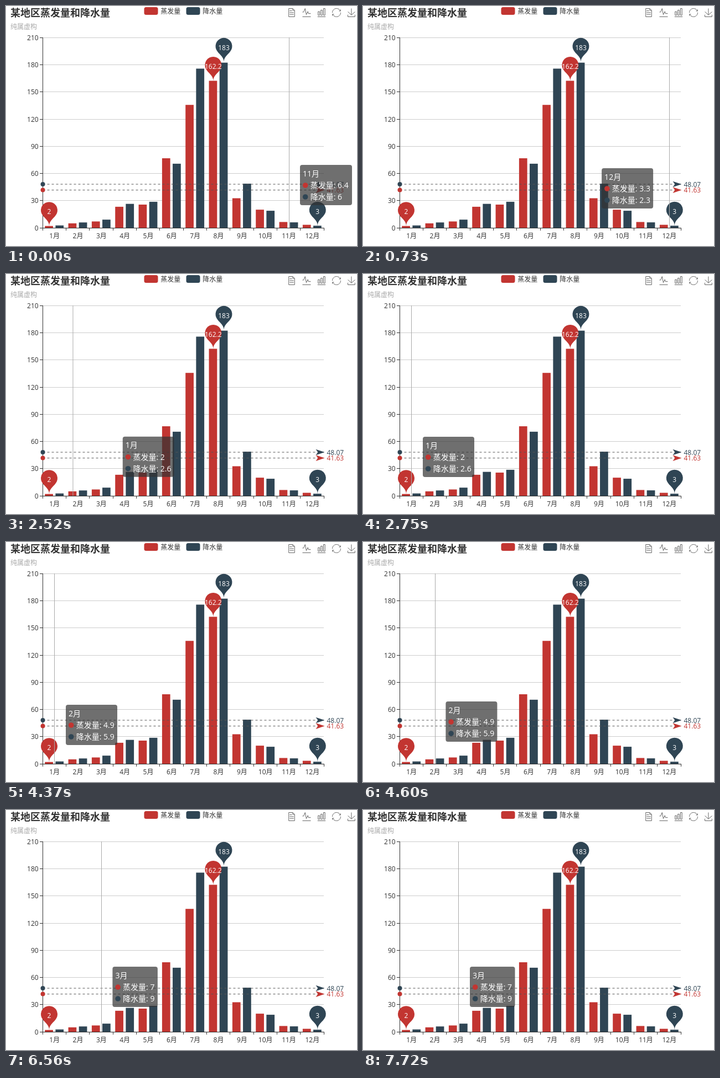
Write an HTML page that moves like this. It is 634x435 px and loops after 8000 ms.

```html
<!DOCTYPE html>
<html lang="zh-CN">
<head>
<meta charset="utf-8">
<title>某地区蒸发量和降水量</title>
<style>
  html, body { margin: 0; width: 100%; height: 100%; overflow: hidden; background: #fff; }
  svg { display: block; width: 634px; height: 435px; }
  text { font: 12px "Open Sans", "Noto Sans CJK SC", "Noto Sans CJK", sans-serif; fill: #333; }
  .title { font-size: 18px; font-weight: 700; }
  .sub { fill: #aaa; }
  .end { text-anchor: end; }
  .mid { text-anchor: middle; }
  .pin { text-anchor: middle; fill: #fff; }
  #tip text { font-size: 14px; fill: #fff; }
  #tools path { fill: none; stroke: #666; vector-effect: non-scaling-stroke; }
</style>
</head>
<body>
<svg viewBox="0 0 634 435">
  <text class="title" x="8" y="18.5">某地区蒸发量和降水量</text>
  <text class="sub" x="8" y="41.5">纯属虚构</text>
  <g id="tools"></g>
  <g id="chart"></g>
  <line id="pointer" y1="57" y2="402" stroke="#aaa"/>
  <g id="tip">
    <rect id="box" height="73" rx="4" fill="rgba(50,50,50,.7)"/>
    <circle cx="9.7" cy="37" r="4.8" fill="#c23531"/>
    <circle cx="9.7" cy="58" r="4.8" fill="#2f4554"/>
    <text id="month" x="5" y="20.7"></text>
    <text id="evap" x="18.7" y="41.9"></text>
    <text id="rain" x="18.7" y="62.9"></text>
  </g>
</svg>
<script>
const RED = '#c23531', BLUE = '#2f4554';
const LEFT = 66, RIGHT = 574, BASE = 402, HEIGHT = 345, MAX = 210;
const BAND = (RIGHT - LEFT) / 12;
const BAR = BAND * 0.8 / 2.3;
const evap = [2, 4.9, 7, 23.2, 25.6, 76.7, 135.6, 162.2, 32.6, 20, 6.4, 3.3];
const rain = [2.6, 5.9, 9, 26.4, 28.7, 70.7, 175.6, 182.2, 48.7, 18.8, 6, 2.3];

const $ = id => document.getElementById(id);
const chart = $('chart');

function add(parent, tag, attrs, text) {
  const el = document.createElementNS('http://www.w3.org/2000/svg', tag);
  for (const key in attrs) el.setAttribute(key, attrs[key]);
  if (text !== undefined) el.textContent = text;
  parent.appendChild(el);
  return el;
}
const path = (d, attrs) => add(chart, 'path', { d, ...attrs });
const label = (x, y, text, attrs) => add(chart, 'text', { x, y, ...attrs }, text);

const yOf = v => BASE - v / MAX * HEIGHT;
const barX = (month, series) => LEFT + BAND * (month + 0.1) + series * BAR * 1.3;

function drawLegend() {
  [['蒸发量', RED, 249.5], ['降水量', BLUE, 325.5]].forEach(([name, fill, x]) => {
    add(chart, 'rect', { x, y: 2, width: 25, height: 14, rx: 3.5, fill });
    label(x + 29.7, 14, name);
  });
}

function drawTools() {
  // Each icon: path, then the centre and scale of its bounds
  const icons = [
    ['M17.5 17.3H33M45.4 29.5h-28M11.5 2v56H51V14.8L38.4 2ZM38.4 2.2v12.7H51M45.4 41.7h-28', 31.2, 30, 0.268],
    ['M4.1 28.9h7.1l9.3-22 7.4 38 9.7-19.7 3 12.8h14.9M4.1 58h51.4', 29.8, 32.4, 0.292],
    ['M6.7 22.9h10V48h-10ZM24.9 13h10v35h-10ZM43.2 2h10v46h-10ZM3.1 58h53.7', 30, 30, 0.268],
    ['M47 18.9h9.8V8.7M56.3 20.1C52.1 9 40.5.6 26.8 2.1 12.6 3.7 1.6 16.2 2.1 30.6M13 41.1H3.1v10.2M3.7 39.9c4.2 11.1 15.8 19.5 29.5 18 14.2-1.6 25.2-14.1 24.7-28.5', 30, 30, 0.268],
    ['M4.7 22.9 29.3 45.5 54.7 23.4M4.6 43.6V58H53.8V43.6M29.2 45.1V0', 29.6, 29, 0.259]
  ];
  icons.forEach(([d, cx, cy, s], i) => add($('tools'), 'path', {
    d, transform: `translate(${516 + 27 * i} 12) scale(${s}) translate(${-cx} ${-cy})`
  }));
}

function drawAxes() {
  for (let v = 0; v <= MAX; v += 30) {
    const y = Math.floor(yOf(v) + 0.2) + 0.5;
    if (v) path(`M${LEFT} ${y}H${RIGHT}`, { stroke: '#ccc' });
    path(`M61 ${y}h5`, { stroke: '#333' });
    label(58.7, y + 4.5, v, { class: 'end' });
  }
  for (let i = 0; i <= 12; i++) {
    path(`M${Math.floor(LEFT + BAND * i) + 0.5} ${BASE}v5`, { stroke: '#333' });
    if (i < 12) label(LEFT + BAND * (i + 0.5) + 0.5, 420.7, i + 1 + '月', { class: 'mid' });
  }
}

function drawBars() {
  [evap, rain].forEach((data, s) => data.forEach((v, i) => add(chart, 'rect', {
    x: barX(i, s), y: yOf(v), width: BAR, height: BASE - yOf(v), fill: s ? BLUE : RED
  })));
  path(`M66.5 57V403M66 402.5H575`, { stroke: '#333', fill: 'none' });
}

function drawAverage(value, color) {
  const y = yOf(value);
  path(`M66.5 ${y}H574`, { stroke: '#555', 'stroke-dasharray': '4 4' });
  add(chart, 'circle', { cx: 66.5, cy: y, r: 4, fill: color });
  path(`M575.5 ${y}l-16 -5.3 4 5.3 -4 5.3Z`, { fill: color });
  label(579.5, y + 4.7, value, { style: 'fill:' + color });
}

function drawPin(month, series, at, text) {
  const x = barX(month, series) + BAR / 2 + 0.4, y = yOf(at);
  path('M-13.55 -22.14A15 15 0 1 1 13.55 -22.14C9.69 -14 0 -10.5 0 0C0 -10.5 -9.69 -14 -13.55 -22.14Z',
    { fill: series ? BLUE : RED, transform: `translate(${x} ${y})` });
  label(x, y - 21.3, text, { class: 'pin' });
}

drawLegend();
drawTools();
drawAxes();
drawBars();
drawAverage(41.63, RED);
drawAverage(48.07, BLUE);
drawPin(7, 0, 162.2, '162.2');
drawPin(0, 0, 2, '2');
drawPin(7, 1, 183, '183');
drawPin(11, 1, 2.3, '3');

// Hover stops: start time, month index, tooltip position and width
const LOOP = 8000, STEP = 76;
const stops = [
  { at: -1000, month: 10, x: 531, y: 288, w: 94 },
  { at: 420, month: 11, x: 431, y: 294, w: 93 },
  { at: 2370, month: 0, x: 108, y: 295, w: 93 },
  { at: 4370, month: 1, x: 150, y: 289, w: 93 },
  { at: 6330, month: 2, x: 193, y: 284, w: 81.5 }
];
const mix = (a, b, k) => a + (b - a) * k;
const pointerX = stop => Math.round(LEFT + BAND * (stop.month + 0.5) + 0.01) + 0.5;

// cubic-bezier(.23, 1, .32, 1)
function easeTip(x) {
  if (x >= 1) return 1;
  let lo = 0, hi = 1;
  for (let i = 0; i < 20; i++) {
    const u = (lo + hi) / 2, v = 1 - u;
    if (0.69 * v * v * u + 0.96 * v * u * u + u * u * u < x) lo = u; else hi = u;
  }
  return 1 - (1 - lo) ** 3;
}
const easePointer = x => x >= 1 ? 1 : x <= 0 ? 0 : 1 - 2 ** (-10 * x);

let shown = null;
function render(now) {
  const t = now % LOOP;
  const i = stops.findLastIndex(s => t >= s.at);
  const to = stops[i], from = stops[Math.max(i - 1, 0)];
  // The motion advances in visible steps
  const elapsed = Math.floor((t - to.at) / STEP) * STEP;
  const k = easeTip(elapsed / 380);
  const px = mix(pointerX(from), pointerX(to), easePointer(elapsed / 200));

  if (shown !== to) {
    shown = to;
    $('month').textContent = to.month + 1 + '月';
    $('evap').textContent = '蒸发量: ' + evap[to.month];
    $('rain').textContent = '降水量: ' + rain[to.month];
    $('box').setAttribute('width', to.w);
  }
  $('tip').setAttribute('transform', `translate(${mix(from.x, to.x, k)} ${mix(from.y, to.y, k)})`);
  $('pointer').setAttribute('x1', px);
  $('pointer').setAttribute('x2', px);
}

function tick() {
  render(performance.now());
  requestAnimationFrame(tick);
}
tick();
</script>
</body>
</html>
```
